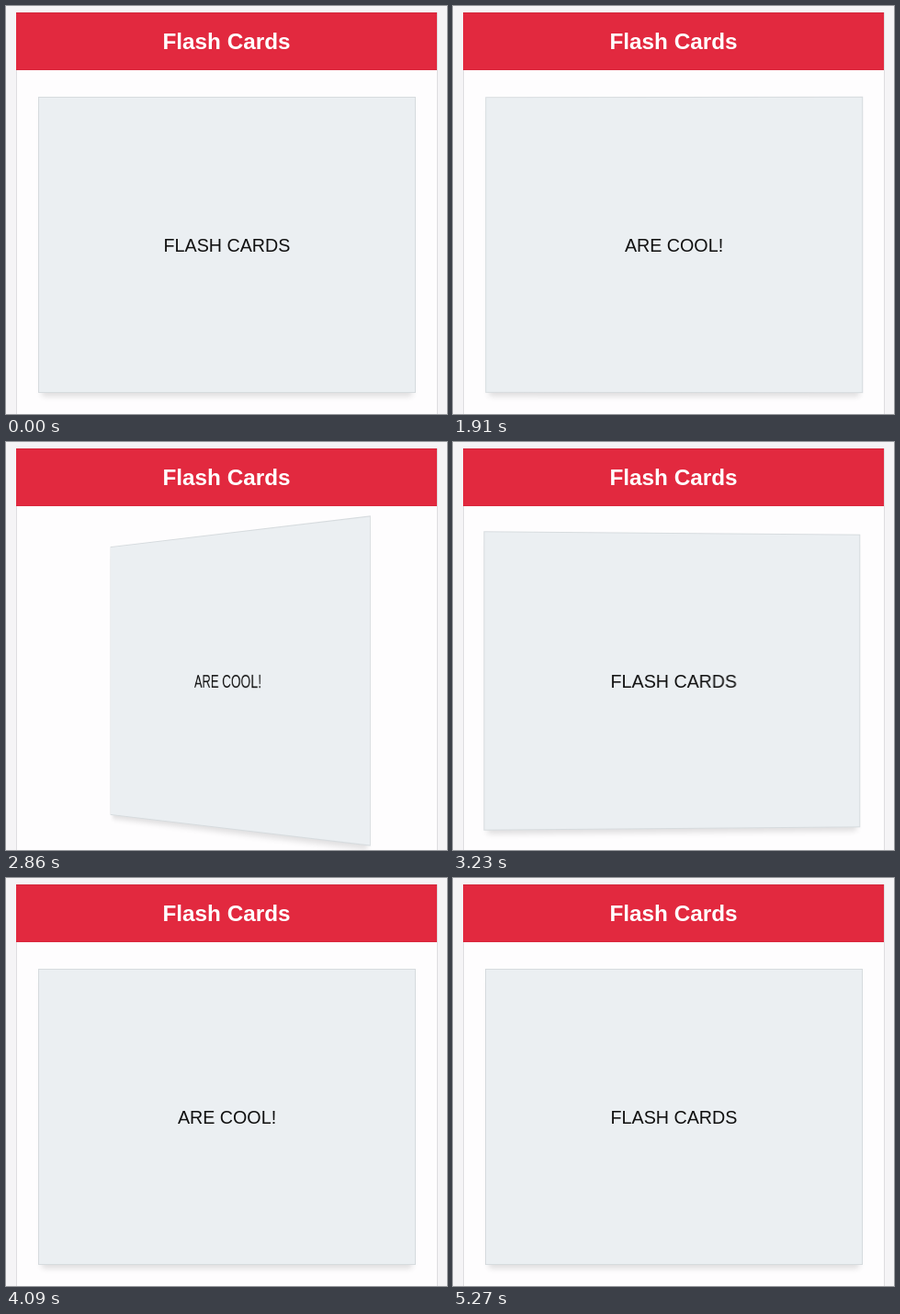
Animation of 480x445 px, one loop 5310 ms. Source, as an HTML page:

```html
<!DOCTYPE html>
<html lang="en">
<head>
<meta charset="utf-8">
<title>Flash Cards</title>
<style>
  html, body {
    margin: 0;
    width: 100%;
    height: 100%;
    overflow: hidden;
    background: #f5f4f6;
    font-family: "Liberation Sans", Arial, sans-serif;
  }
  body { position: relative; }
  .panel {
    position: absolute;
    box-sizing: border-box;
    left: 11px;
    top: 7px;
    width: 459px;
    height: 460px;
    background: #fefdfe;
    border: solid #dedde0;
    border-width: 0 1px;
  }
  header {
    position: absolute;
    left: 11px;
    top: 7px;
    width: 458px;
    height: 63px;
    background: #e2293f;
    box-shadow: inset 0 1px #d3283c, inset 0 -1px #d9283d;
    color: #fff;
    font-weight: bold;
    font-size: 24.3px;
    line-height: 63px;
    text-align: center;
  }
  .scene {
    position: absolute;
    left: 35px;
    top: 99px;
    width: 411px;
    height: 323px;
    perspective: 1450px;
  }
  .card, .face { position: absolute; inset: 0; }
  .card { transform-style: preserve-3d; }
  .face {
    box-sizing: border-box;
    display: flex;
    align-items: center;
    justify-content: center;
    padding-top: 1px;
    border: 1px solid #d6dbde;
    background: #ebeff2;
    box-shadow: 0 8px 6px -4px rgba(0, 0, 0, .12);
    color: #111;
    font-size: 19.7px;
    backface-visibility: hidden;
  }
  .back { transform: rotateY(180deg); }
</style>
</head>
<body>
<div class="panel"></div>
<header>Flash Cards</header>
<div class="scene">
  <div class="card">
    <div class="face">FLASH CARDS</div>
    <div class="face back">ARE COOL!</div>
  </div>
</div>
<script>
const LOOP = 5310, FLIP = 600;
const starts = [1350, 2750, 3412, 4130];   // flips alternate between back and front
const card = document.querySelector('.card');

// cubic-bezier(.25, .1, .25, 1)
function ease(x) {
  const curve = (s, a, b) => 3 * s * (1 - s) ** 2 * a + 3 * s * s * (1 - s) * b + s ** 3;
  let lo = 0, hi = 1;
  for (let i = 0; i < 24; i++) {
    const mid = (lo + hi) / 2;
    if (curve(mid, .25, .25) < x) lo = mid; else hi = mid;
  }
  return curve(lo, .1, 1);
}

function angleAt(t) {
  let turn = 0;
  starts.forEach((start, i) => {
    const p = Math.min(1, Math.max(0, (t - start) / FLIP));
    if (p > 0) turn += (i % 2 ? -1 : 1) * (p < 1 ? ease(p) : 1);
  });
  return turn * 180;
}

function draw() {
  card.style.transform = `rotateY(${angleAt(performance.now() % LOOP)}deg)`;
  requestAnimationFrame(draw);
}
draw();
</script>
</body>
</html>
```
